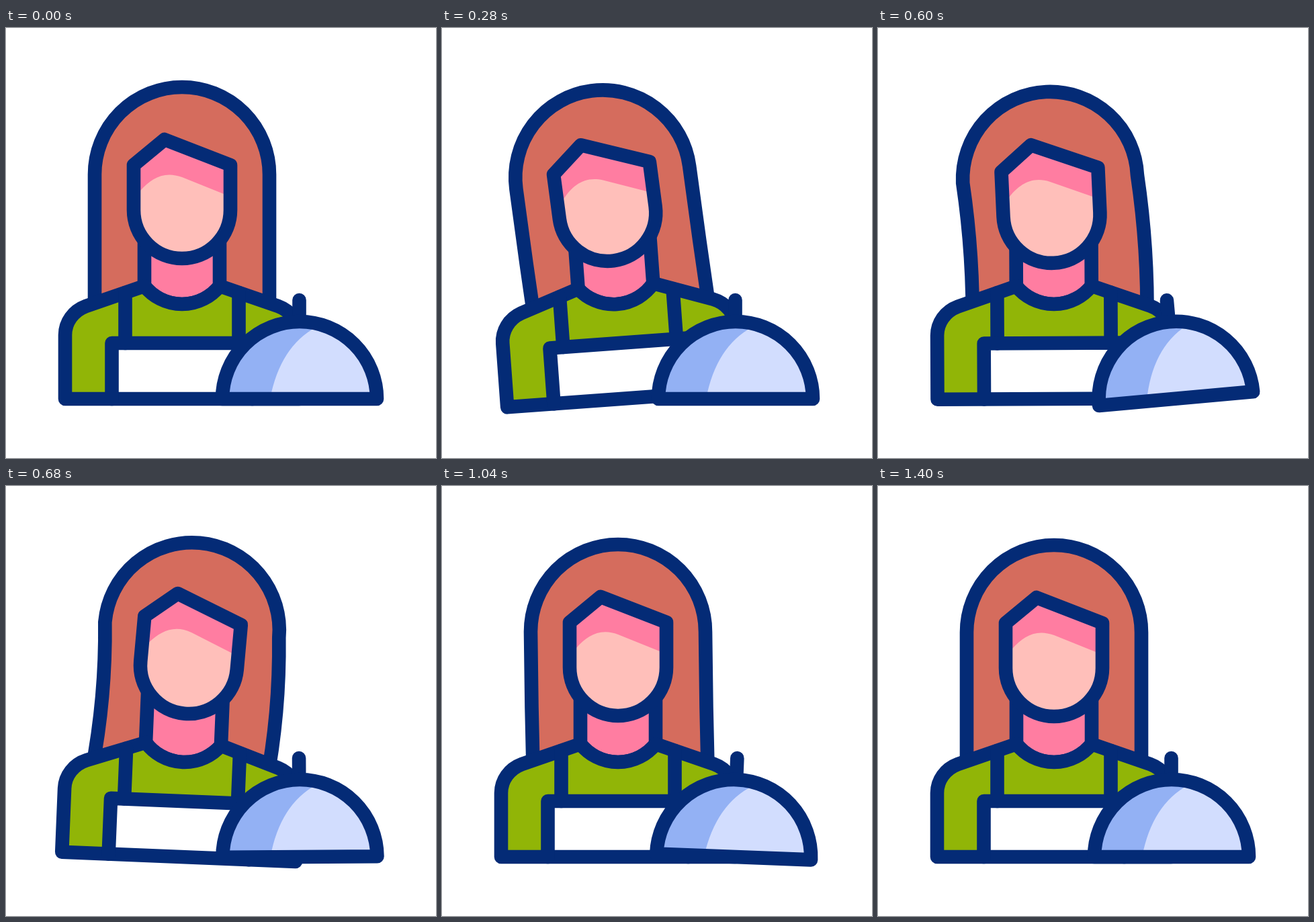
An HTML page with a canvas for the animation above (1480 ms loop, 640 by 640 pixels).

```html
<!DOCTYPE html>
<html lang="en">
<head>
<meta charset="utf-8">
<title>Waitress with cloche</title>
<style>
  html, body { margin: 0; width: 100%; height: 100%; overflow: hidden; background: #fff; }
  canvas { display: block; width: 640px; height: 640px; }
</style>
</head>
<body>
<canvas id="stage" width="640" height="640"></canvas>
<script>
const ctx = document.getElementById('stage').getContext('2d');
const LOOP = 1480, STEP = 40, LAST = 1400;
const NAVY = '#042b76', HAIR = '#d56c5d', GREEN = '#91b507', PINK = '#ff7da1',
      SKIN = '#ffbfba', STEEL = '#93b1f4', SHINE = '#d2ddfe';

// Swings from zero through [time, value] turning points and back, easing in and out of each.
function swing(start, turns, end) {
  const keys = [[start, 0], ...turns, [end, 0]];
  return time => {
    const i = keys.findIndex(([t]) => t > time);
    if (i < 1) return 0;
    const [t0, v0] = keys[i - 1], [t1, v1] = keys[i];
    const u = (time - t0) / (t1 - t0);
    return v0 + (v1 - v0) * u * u * (3 - 2 * u);
  };
}

const bodyTurn = swing(80, [[400, -6.1], [735, 3], [800, 3]], 1040);
const headTurn = swing(100, [[450, -14.5], [730, 7], [800, 7]], 1040);
const headDrop = swing(220, [[455, 19.3], [800, -13.5]], 1090);
const hairBulge = swing(300, [[650, 12], [900, 1.5]], 1240);
const hairTip = swing(150, [[520, 6], [850, -6], [1040, 4]], 1240);
const domeTurn = swing(280, [[530, -7], [830, 6.3]], 1180);

function turned(x, y, degrees, draw) {
  ctx.save();
  ctx.translate(x, y);
  ctx.rotate(degrees * Math.PI / 180);
  ctx.translate(-x, -y);
  draw();
  ctx.restore();
}

function fill(path, color) {
  ctx.fillStyle = color;
  ctx.fill(path);
}

// A filled, outlined shape with a second tone inside it.
function twoTone(shape, color, inner, innerColor) {
  fill(shape, color);
  ctx.save();
  ctx.clip(shape);
  fill(inner, innerColor);
  ctx.restore();
  ctx.stroke(shape);
}

const neck = new Path2D('M206 290V384A71.6 71.6 0 0 0 318 384V290');
const torso = new Path2D('M88 552V457C88 438 100 421 119 414L206 384A71.6 71.6 0 0 0 318 384' +
  'L405 414C424 421 436 438 436 457V552Z');
const straps = new Path2D('M177.5 394V469M346.5 394V469');
const apron = new Path2D('M157.5 552V469H366.5V552');
const face = new Path2D('M190 204L236 166L334 204V271A72 72 0 0 1 190 271Z');
const litFace = new Path2D('M190 252L200 242C216 224 235 212 262 222L334 251V350H190Z');
const dome = new Path2D('M322 552A115 115 0 0 1 552 552Z');
const domeShine = new Path2D('M462 445Q408 474 393 552H560V430H462Z');
const knob = new Path2D('M436.5 405V440');

function drawHair(bulge, tip) {
  const hair = new Path2D();
  hair.moveTo(132 + tip, 441);
  hair.quadraticCurveTo(132 + bulge, 329.5, 132, 218);
  hair.arc(262, 218, 130, Math.PI, 0);
  hair.quadraticCurveTo(392 + bulge, 329.5, 392 + tip, 441);
  fill(hair, HAIR);
  ctx.lineCap = 'butt';
  ctx.stroke(hair);
  ctx.lineCap = 'round';
}

function drawBody() {
  fill(neck, PINK);
  ctx.stroke(neck);
  fill(torso, GREEN);
  fill(apron, '#fff');
  for (const path of [torso, straps, apron]) ctx.stroke(path);
}

function drawDome() {
  ctx.stroke(knob);
  twoTone(dome, STEEL, domeShine, SHINE);
}

function render(time) {
  ctx.fillStyle = '#fff';
  ctx.fillRect(0, 0, 640, 640);
  ctx.strokeStyle = NAVY;
  ctx.lineWidth = 20.6;
  ctx.lineJoin = ctx.lineCap = 'round';

  const lean = bodyTurn(time);
  const onBody = draw => turned(262, 432, lean, draw);
  const onHead = draw => {
    ctx.save();
    ctx.translate(0, headDrop(time));
    onBody(() => turned(262, 340, headTurn(time) - lean, draw));
    ctx.restore();
  };

  onHead(() => drawHair(hairBulge(time), hairTip(time)));
  onBody(drawBody);
  onHead(() => twoTone(face, PINK, litFace, SKIN));
  turned(437, 478.5, domeTurn(time), drawDome);
}

const start = performance.now();
function tick() {
  const time = (performance.now() - start) % LOOP;
  render(Math.min(LAST, Math.floor(time / STEP) * STEP));
  requestAnimationFrame(tick);
}
tick();
</script>
</body>
</html>
```
